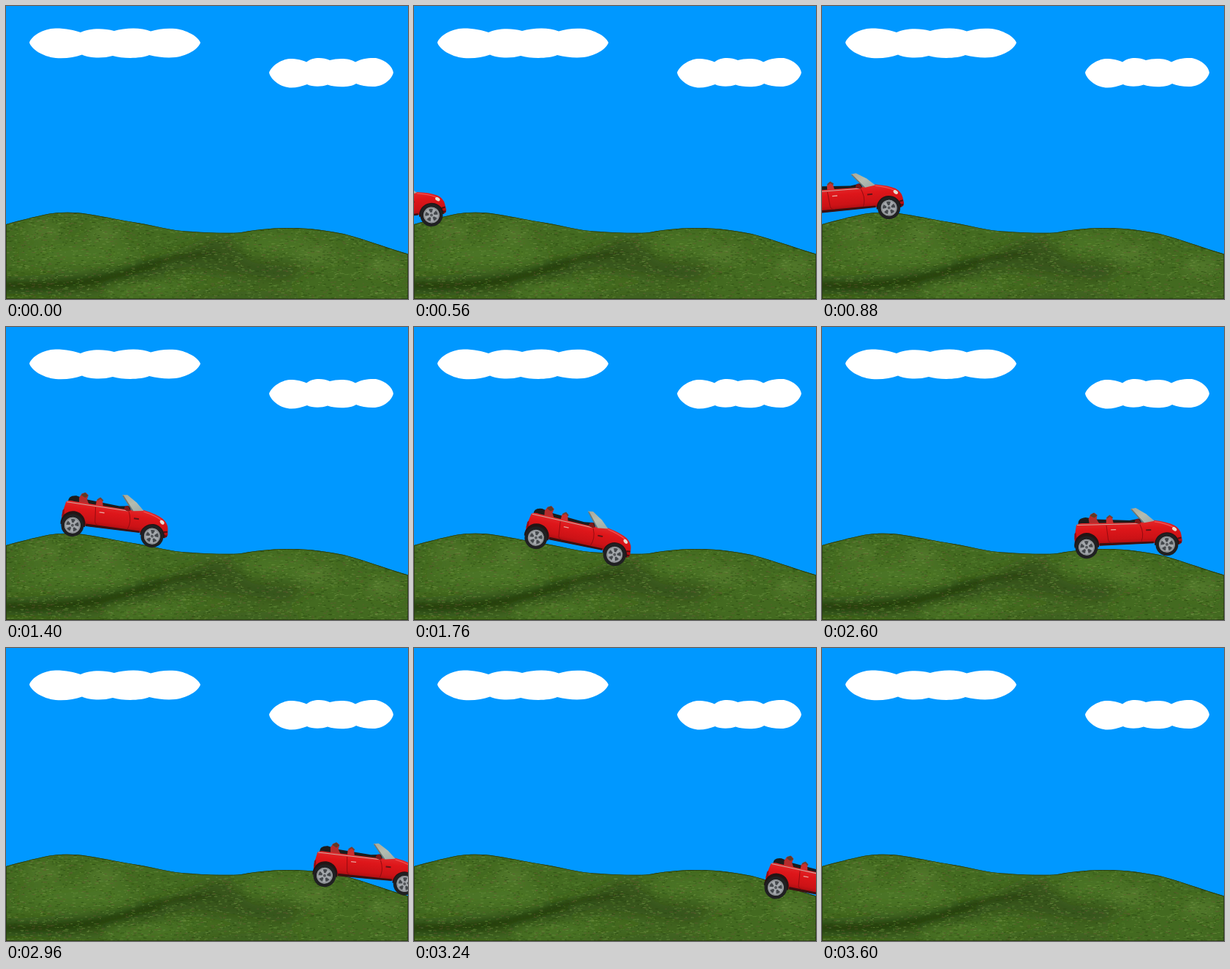
Write an HTML page that moves like this. It is 550x400 px and loops after 4040 ms.

```html
<!DOCTYPE html>
<html lang="en">
<head>
<meta charset="utf-8">
<title>Car over the hills</title>
<style>
  html, body { margin: 0; width: 100%; height: 100%; overflow: hidden; background: #0098ff; }
  svg { display: block; width: 550px; height: 400px; }
</style>
</head>
<body>
<svg viewBox="0 0 550 400" xmlns="http://www.w3.org/2000/svg">
  <defs>
    <path id="hill" d="M0 298C22 292 38 288 52 285C70 281 94 281 112 284C138 288 160 293 180 296C204 300 224 306 246 307.500C272 309 300 311 322 309C348 304 370 303 390 303C418 303 440 307 462 311C490 318 520 330 550 338.500V400H0Z"/>
    <clipPath id="ground"><use href="#hill"/></clipPath>
    <filter id="soft" x="-30%" y="-60%" width="160%" height="220%"><feGaussianBlur stdDeviation="8"/></filter>
    <filter id="softer" x="-30%" y="-60%" width="160%" height="220%"><feGaussianBlur stdDeviation="3"/></filter>
    <linearGradient id="paint" x1="0" y1="0" x2="0" y2="1">
      <stop offset="0" stop-color="#e22a2c"/>
      <stop offset=".3" stop-color="#de161a"/>
      <stop offset=".7" stop-color="#cc1216"/>
      <stop offset="1" stop-color="#980c10"/>
    </linearGradient>
    <linearGradient id="glass" x1="0" y1="0" x2="1" y2="1">
      <stop offset="0" stop-color="#a8a898"/>
      <stop offset=".5" stop-color="#b4bcb0"/>
      <stop offset="1" stop-color="#98a8a8"/>
    </linearGradient>
    <g id="wheel">
      <circle r="15.500" fill="#202022"/>
      <circle r="11" fill="#a4a8ac"/>
      <circle r="10" fill="none" stroke="#84888c" stroke-width="1"/>
      <g id="holes" fill="#44484c"></g>
      <circle r="2" fill="#55585c"/>
    </g>
  </defs>

  <rect width="550" height="400" fill="#0098ff"/>
  <g fill="#fff">
    <path d="M32 50C35 41 50 31 68 30.500C82 30.500 94 33 102 36C112 31 132 29.500 148 34C162 30 184 28.500 198 34.500C208 31 220 30 232 31C248 33 263 42 266 50C263 59 248 68 232 70C220 71 208 70 196 67C184 72 160 72 146 68C132 72 114 71 104 66.500C94 70 82 72 68 71C50 69 35 59 32 50Z"/>
    <path d="M360 91C363 82 376 73 388 72C398 72 406 74 411 76.500C420 69 434 70 443 74C454 71 470 71 478 76.500C486 72 496 70.500 506 71C518 73 529 82 530 91C528 100 517 109 505 110C496 110.500 486 109 479 106C470 112 450 111 440 107.500C430 111 418 110 412 107C404 110 396 112 388 111.500C374 110 362 100 360 91Z"/>
  </g>

  <g clip-path="url(#ground)">
    <rect y="270" width="550" height="130" fill="#436a20"/>
    <g filter="url(#soft)">
      <path d="M-20 374C80 370 150 368 215 345S270 318 300 315L335 345L420 355L380 378L250 360L120 392H-20Z" fill="#34501a" opacity=".8"/>
      <path d="M-20 384C70 386 140 376 210 349" fill="none" stroke="#203a0c" stroke-width="13" opacity=".8"/>
      <path d="M240 400Q330 372 400 392L390 410H240Z" fill="#3c5c1c" opacity=".6"/>
      <g fill="#5c8230" opacity=".75">
        <ellipse cx="52" cy="308" rx="24" ry="7"/>
        <ellipse cx="135" cy="311" rx="24" ry="8"/>
        <ellipse cx="424" cy="338" rx="28" ry="9"/>
        <ellipse cx="517" cy="356" rx="24" ry="9"/>
      </g>
      <g fill="#4d7826" opacity=".8">
        <ellipse cx="100" cy="338" rx="80" ry="14"/>
        <ellipse cx="370" cy="325" rx="42" ry="10"/>
        <ellipse cx="190" cy="385" rx="55" ry="9"/>
      </g>
    </g>
    <path d="M0 381C70 385 130 376 180 359S240 341 285 337" fill="none" stroke="#1c3208" stroke-width="5" opacity=".65" filter="url(#softer)"/>
    <g id="flecks" fill="none" stroke-width="1" opacity=".5"></g>
    <use href="#hill" fill="none" stroke="#24380e" stroke-width="1.500"/>
  </g>

  <g id="car">
    <path d="M-10 -30Q-12 -39 0 -40L14 -37L60 -34L74 -36L78 -27H-10Z" fill="#1c1c1c"/>
    <path d="M5 -30L4 -38L7 -44L12 -46L16 -43L15 -37L19 -30Z" fill="#b42c2c"/>
    <path d="M6 -42L11 -46L16 -42L12 -39Z" fill="#5c3c28"/>
    <path d="M28 -30V-37L31 -41L36 -40L38 -30Z" fill="#c83030"/>
    <path d="M29 -38L33 -41L37 -38" fill="none" stroke="#744030" stroke-width="2"/>
    <path d="M-13 -30Q-10 -33 -2 -32L72 -30.500L94 -33Q112 -30 121 -25Q129 -20 130 -12L131 -4Q130 1 126 1L92 -2L18 -1L-13 1Q-17 -5 -16 -14Z" fill="url(#paint)"/>
    <path d="M18 -4L92 -4V-1.500L18 -.500Z" fill="#3c1010"/>
    <path d="M-12 -30L72 -29" stroke="#c8a8a0" stroke-width="1"/>
    <path d="M28 -28L30 -8Q31 -4 36 -4M74 -28Q80 -15 75 -4" fill="none" stroke="#940c10" stroke-width="1"/>
    <path d="M34 -22H41" stroke="#e8a8a0" stroke-width="1.300"/>
    <path d="M82 -20H89" stroke="#601418" stroke-width="2"/>
    <path d="M94 -31Q110 -28 119 -23" fill="none" stroke="#f05050" stroke-width="1.300"/>
    <path d="M62 -49.500L69 -50.500L83 -42L94 -32L80 -30Z" fill="url(#glass)"/>
    <path d="M63 -49L79 -30" stroke="#74746c" stroke-width="1.500"/>
    <path d="M67 -31Q67 -36 72 -36L76 -30Q72 -27 67 -31Z" fill="#7c1818"/>
    <ellipse cx="121" cy="-20" rx="3.500" ry="2.300" transform="rotate(40 121 -20)" fill="#e8dcd0"/>
    <path d="M125 -7L130 -8M126 -2H130" stroke="#4c1010" stroke-width="2"/>
    <path d="M-16 -18L-14 -20L-13 -11L-16 -10Z" fill="#980c10"/>
    <path d="M-16.500 1A17 17 0 1 1 17 1ZM93 1A17 17 0 1 1 127 1Z" fill="#241414"/>
    <use href="#wheel" y=".7"/>
    <use href="#wheel" x="110" y=".7"/>
  </g>
</svg>
<script>
const LOOP = 4040, STEP = 40, ENTER = 400, LEAVE = 3600;

// time, rear wheel x, rear wheel y, tilt in degrees
const ROUTE = [
  [400, -119, 305, -8],
  [880, -18, 284.5, -5],
  [1160, 41, 272, 1.5],
  [1280, 66, 268, 5.5],
  [1400, 91, 270, 7.8],
  [1760, 167, 287, 12.1],
  [1840, 186, 292, 11],
  [2040, 234, 306, -3],
  [2240, 285, 315, -11.9],
  [2600, 362, 300, -2],
  [2960, 436, 310, 5.9],
  [3160, 478, 320, 10],
  [3600, 572, 355, 18]
];

const byId = id => document.getElementById(id);

function addPath(parent, attrs) {
  const path = document.createElementNS('http://www.w3.org/2000/svg', 'path');
  for (const name in attrs) path.setAttribute(name, attrs[name]);
  parent.appendChild(path);
}

function drawWheelHoles() {
  for (let i = 0; i < 5; i++) {
    addPath(byId('holes'), { d: 'M-1 -3.5L-3 -8Q0 -9.5 3 -8L1 -3.5Z', transform: `rotate(${i * 72})` });
  }
}

function drawFlecks() {
  let seed = 17;
  const random = () => (seed = seed * 16807 % 2147483647) / 2147483647;
  for (const stroke of ['#203c0a', '#2e4e12', '#6c9640', '#5a8830', '#70583a', '#80a050']) {
    let d = '';
    for (let i = 0; i < 700; i++) {
      const x = random() * 550, y = 280 + random() * 120, length = 1 + random() * 4;
      d += `M${x.toFixed(1)} ${y.toFixed(1)}h${length.toFixed(1)}`;
    }
    addPath(byId('flecks'), { d, stroke });
  }
}

function poseAt(time) {
  const i = Math.max(1, ROUTE.findIndex(key => key[0] >= time));
  const from = ROUTE[i - 1], to = ROUTE[i];
  const part = (time - from[0]) / (to[0] - from[0]);
  return from.map((value, k) => value + (to[k] - value) * part);
}

const car = byId('car');

function render(now) {
  const time = Math.floor(now % LOOP / STEP) * STEP;
  const visible = time >= ENTER && time < LEAVE;
  car.setAttribute('visibility', visible ? 'visible' : 'hidden');
  if (visible) {
    const [, x, y, tilt] = poseAt(time);
    car.setAttribute('transform', `translate(${x} ${y}) rotate(${tilt})`);
  }
}

drawWheelHoles();
drawFlecks();
const start = performance.now();
function tick() {
  render(performance.now() - start);
  requestAnimationFrame(tick);
}
tick();
</script>
</body>
</html>
```
